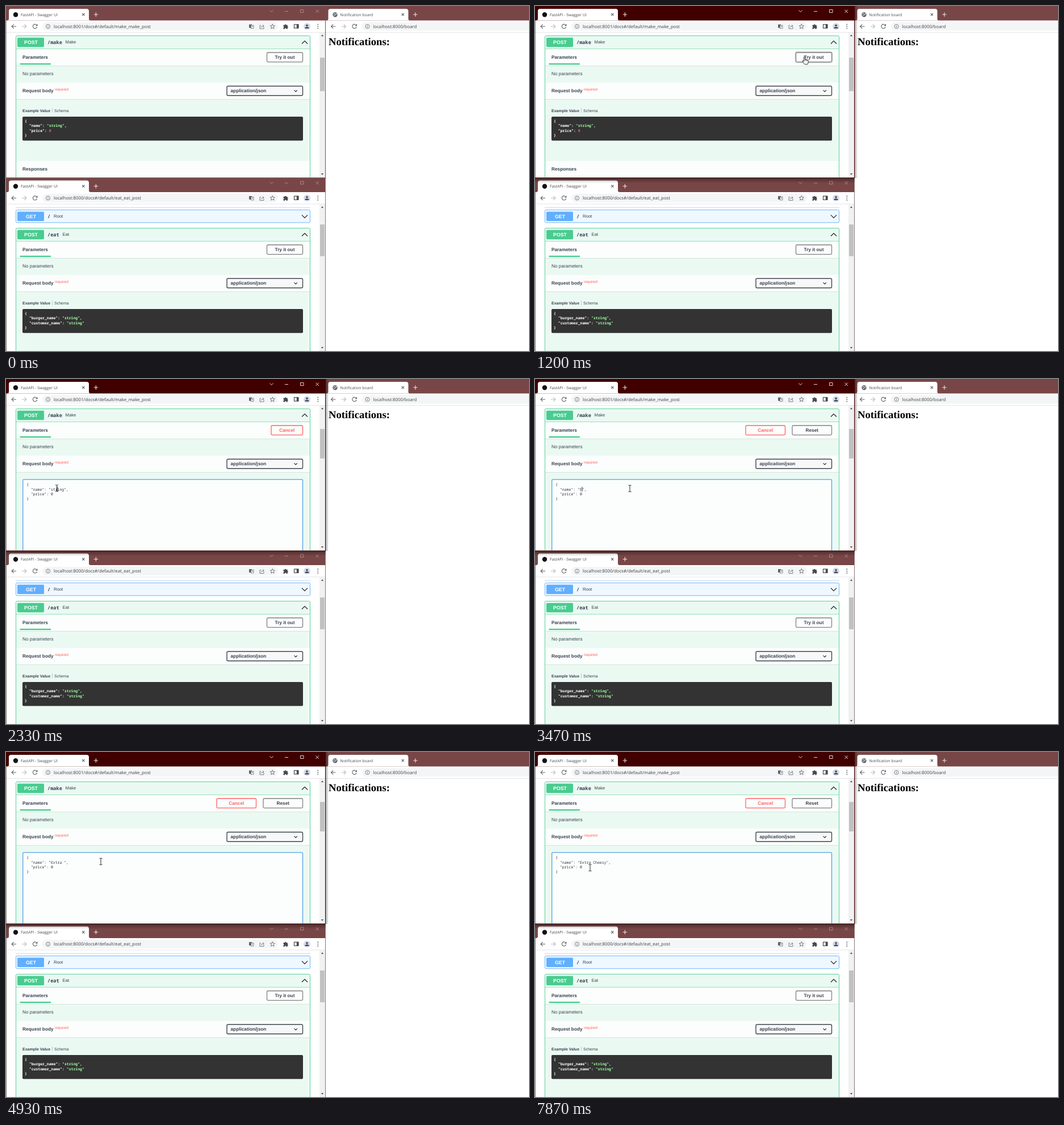
An HTML page for the animation above (8 s loop, 921 by 608 pixels).

```html
<!DOCTYPE html>
<html lang="en">
<head>
<meta charset="utf-8">
<title>Notification board</title>
<style>
  html, body { margin: 0; width: 100%; height: 100%; overflow: hidden; background: #fff; }
  svg { display: block; width: 921px; height: 608px; }
  text { fill: #3b4151; font: 8.25px "Liberation Sans", Arial, sans-serif; text-rendering: geometricPrecision; white-space: pre; }
  .b { font-weight: 700; }
  .tab { font: 6.85px "Open Sans", sans-serif; fill: #45494d; }
  .url { font: 7.77px "Open Sans", sans-serif; fill: #3c4043; }
  .verb { font-size: 8.8px; font-weight: 700; fill: #fff; text-anchor: middle; }
  .path { font: 700 8.65px "Noto Sans Mono", monospace; }
  .desc { font-size: 7.7px; }
  .small { font-size: 7px; }
  .req { font-size: 6.5px; fill: #f33; fill-opacity: .8; }
  .code { font: 6.48px "Noto Sans Mono", monospace; fill: #2b3038; }
  .dark .code { font-weight: 700; fill: #fff; }
  .dark .str { fill: #a2fca2; }
  .dark .num { fill: #d36363; }
  .mid { text-anchor: middle; }
  .head { font: 700 18.7px "Liberation Serif", "Times New Roman", serif; fill: #000; }
  .ico { fill: none; stroke: #5f6368; stroke-width: 1.1; }
  .off { stroke: #b9bcc0; }
  .hover { filter: drop-shadow(0 0 1.3px rgba(0, 0, 0, .5)); }
</style>
</head>
<body>
<svg id="stage" viewBox="0 0 921 608"></svg>
<script>
const CH = 3.888, LOOP = 8000;
const IDLE = '#784646', ACTIVE = '#400000';

const rect = (x, y, w, h, fill, more = '') =>
  `<rect x="${x}" y="${y}" width="${w}" height="${h}" fill="${fill}" ${more}/>`;
const text = (x, y, s, cls = '', more = '') => `<text x="${x}" y="${y}" class="${cls}" ${more}>${s}</text>`;
const line = (d, cls = 'ico', more = '') => `<path d="${d}" class="${cls}" ${more}/>`;
const stroke = (color, width) => `fill="none" stroke="${color}" stroke-width="${width}"`;
const group = (id, body, more = '') => `<g id="${id}" ${more}>${body}</g>`;
const at = (x, y, body) => `<g transform="translate(${x} ${y})">${body}</g>`;

function controls(id) {
  return group(id, `<path d="M464.5 7.5l3 3 3-3M491 9.5h6M518.5 6.5h5.5v5h-5.5zM545.5 6.5l5.5 5.5m0-5.5l-5.5 5.5"/>`,
    'fill="none" stroke="#b18f8f" stroke-width=".9"');
}

function toolbar() {
  return line('M440 0') +
    rect(428, 32.5, 5, 6, '#5f6368') + rect(431.5, 34, 4.5, 5.5, '#fff', 'stroke="#5f6368" stroke-width=".7"') +
    line('M432.8 36h2.2M434 35v3', 'ico', 'style="stroke-width:.6"') +
    line('M449 34h-2v6h7v-3M449 38q.5-3 5-3m-1.8-2l2 2-2 2', 'ico', 'style="stroke-width:.8"') +
    line('M469.3 31.8l1.2 2.7 2.9.3-2.2 2 .7 2.9-2.6-1.5-2.6 1.5.7-2.9-2.2-2 2.9-.3z', 'ico', 'style="stroke-width:.9"') +
    '<path d="M488.5 33.5h2.4a1.3 1.3 0 0 1 2.6 0h2.3v2.4a1.3 1.3 0 0 1 0 2.5v2h-2.3a1.3 1.3 0 0 0-2.6 0h-2.4v-2.2a1.3 1.3 0 0 0 0-2.5z" fill="#45494d"/>' +
    rect(507.5, 32.5, 7.5, 6.5, 'none', 'stroke="#45494d" stroke-width="1.2"') + rect(511.8, 32.5, 3.2, 6.5, '#45494d') +
    '<circle cx="530" cy="36" r="6" fill="#d5dbe8"/><circle cx="530" cy="34.2" r="1.8" fill="#3f485c"/>' +
    '<path d="M526.3 39.5q0-2.7 3.7-2.7t3.7 2.7z" fill="#3f485c"/>' +
    [32.5, 36, 39.5].map(y => `<circle cx="549.3" cy="${y}" r=".9" fill="#5f6368"/>`).join('');
}

// Browser frame: title bar, tab and address row
function chrome(id, w, h, title, url, icon) {
  return rect(0, 0, w, h, '#fff') + rect(0, 0, w, 25.5, IDLE, `id="${id}"`) +
    `<path d="M2 25.5q3 0 3-3V9q0-4 4-4h133q4 0 4 4v13.500q0 3 3 3z" fill="#fff"/>` + icon +
    text(26, 17.6, title, 'tab') +
    line('M134.200 13l4.200 4.200m0-4.200l-4.200 4.200') +
    line('M154.700 15h7.400M158.400 11.300v7.400', 'ico', 'style="stroke:#f1e6e6"') +
    line('M18 36h-8m3.700-3.700L10 36l3.700 3.700') +
    line('M28 36h8m-3.700-3.700L36 36l-3.700 3.700', 'ico off') +
    line('M54.300 34a3.700 3.700 0 1 0 .3 3M55 32v2.700h-2.700') +
    rect(64, 28.5, w < 400 ? 400 : 415, 15, '#f4f5f6', 'rx="7.5"') +
    '<circle cx="74" cy="36" r="3.600" class="ico" style="stroke-width:.8"/>' +
    line('M74 35.400v2.600M74 33.700v.9', 'ico', 'style="stroke-width:.8"') +
    text(84, 38.7, url, 'url') + rect(0, 46, w, .8, '#dcdfe3');
}

function scrollbar(top, bottom, y, h, id) {
  return rect(552, top, 10, bottom - top, '#f1f1f1') +
    rect(553, y, 8, h, '#c1c1c1', `id="${id}"`) +
    `<path d="M554.800 ${top + 6.5}l2.200-2.700 2.200 2.700zM554.800 ${bottom - 7}l2.200 2.700 2.200-2.700z" fill="#505050"/>`;
}

function blockHead(y, h, color, tint, verb, path, desc, descX, open) {
  const c = y + 11.5, s = open ? 1 : -1;
  return rect(17.5, y, 518, h, tint, `rx="2" stroke="${color}" stroke-width=".9"`) +
    rect(20, y + 3.2, 47, 16.6, color, 'rx="1.800"') + text(44, c + 3.1, verb, 'verb') +
    text(73, c + 3, path, 'path') + text(descX, c + 2.4, desc, 'desc') +
    line(`M521 ${c + 2.5 * s}l5 ${-5 * s} 5 ${5 * s}`, 'ico', 'style="stroke:#222;stroke-width:1.200"');
}

function button(id, x, w, label, color = '#3b4151', edge = '#808080') {
  return group(id, rect(x, 82, w, 16.6, '#fcfefd', `rx="1.800" stroke="${edge}" stroke-width="1.300"`) +
    text(x + w / 2, 93.3, label, 'b mid', `style="fill:${color}"`));
}

// Expanded endpoint, laid out for the upper window
function endpoint(path, desc, descX, buttons, body) {
  const white = 'rgba(255,255,255,.8)';
  return blockHead(52.5, 270, '#49cc90', '#ebf9f3', 'POST', path, desc, descX, true) +
    rect(17.5, 75, 518, .8, '#7ddab0') +
    rect(18, 76, 517, 29, white) + rect(18, 105, 517, .9, '#d3e5dd') +
    text(29, 93.2, 'Parameters', 'b') + rect(24.5, 101, 54.5, 2.4, '#49cc90') +
    text(29, 121.5, 'No parameters') +
    rect(18, 135, 517, 29, white) + rect(18, 164, 517, .9, '#d3e5dd') +
    text(29, 152.4, 'Request body', 'b') + text(86, 149.2, 'required', 'req') +
    rect(389, 141.2, 133.5, 16.6, '#f7f9f9', 'rx="2" stroke="#41444e" stroke-width="1.400"') +
    text(395.5, 152.4, 'application/json', 'b') +
    line('M507.500 148.300l2.700 2.700 2.700-2.700', 'ico', 'style="stroke:#222"') + buttons + body;
}

function example(lines) {
  return text(29, 186.5, 'Example Value', 'small b') + rect(81.3, 180, .6, 8, '#9aa3a0') +
    text(85, 186.5, 'Schema', 'small') +
    '<g class="dark">' + rect(29, 195, 494, 42.3, '#333', 'rx="2"') +
    text(33, 205.2, '{', 'code') +
    lines.map(([key, val, cls, end], i) =>
      text(33 + 2 * CH, 213.4 + 8.2 * i,
        `"${key}": <tspan class="${cls}">${val}</tspan>${end}`, 'code')).join('') +
    text(33, 229.8, '}', 'code') + '</g>';
}

const dot = '<circle cx="17" cy="15.300" r="4.200" fill="#111"/>';
const globe = '<circle cx="17" cy="15.300" r="4.200" fill="#5f6368"/>' +
  '<path d="M14 14.500q2 .2 2.500-2.500M15 18q0-2 2-2t1.500-2 2 0" fill="none" stroke="#fff" stroke-width=".9"/>';

const editor = rect(29, 176.5, 494, 140, '#fbfefc', 'id="field" rx="1.500"') +
  group('json', rect(79, 189.7, 6 * CH, 8.4, '#3390ff', 'id="mark"') +
    text(36.2, 188.4, '{', 'code') + text(36.2 + 2 * CH, 196.5, '', 'code', 'id="name"') +
    text(36.2 + 2 * CH, 204.6, '"price": 0', 'code') + text(36.2, 212.7, '}', 'code')) +
  rect(0, 0, .8, 8.5, '#111', 'id="caret"');

const upper = chrome('bar', 562, 303, 'FastAPI - Swagger UI', 'localhost:8001/docs#/default/make_make_post', dot) +
  controls('ctl') + toolbar() +
  endpoint('/make', 'Make', 104.5,
    button('try', 459.5, 63, 'Try it out') + button('cancel', 467, 55.5, 'Cancel') +
    button('cancel2', 371, 69.5, 'Cancel', '#ff6060', '#ff6060') + button('reset', 453, 69.5, 'Reset'),
    group('sample', example([['name', '"string"', 'str', ','], ['price', '0', 'num', '']]) +
      rect(18, 273, 517, 40, 'rgba(255,255,255,.8)') + text(29, 290.3, 'Responses', 'b')) +
    group('edit', editor)) +
  scrollbar(46.8, 302, 91, 59, 'thumb');

const lower = at(0, 302.5, chrome('bar2', 562, 306, 'FastAPI - Swagger UI',
    'localhost:8000/docs#/default/eat_eat_post', dot) + controls('ctl2') + toolbar()) +
  rect(17, 354.6, 519, .9, '#b5d4f2') +
  blockHead(359.3, 22.5, '#61affe', '#eff7ff', 'GET', '/', 'Root', 84, false) +
  at(0, 339, endpoint('/eat', 'Eat', 99.5, button('try2', 459.5, 63, 'Try it out'),
    example([['burger_name', '"string"', 'str', ','], ['customer_name', '"string"', 'str', '']]))) +
  scrollbar(349.3, 608, 385, 56, 'thumb2');

const right = at(562.5, 0, chrome('bar3', 359, 608, 'Notification board', 'localhost:8000/board', globe)) +
  text(568, 69, 'Notifications:', 'head');

const fade = (id, x, y) => `<linearGradient id="${id}" x2="${x}" y2="${y}">` +
  '<stop stop-opacity=".35"/><stop offset="1" stop-opacity="0"/></linearGradient>';

const cursors = group('arrow', '<path d="M0 0v11.500l2.700-2.500 1.800 4 1.900-.8-1.800-4h3.700z" fill="#fff" stroke="#000" stroke-width=".8"/>') +
  group('hand', '<path d="M-1 .8q1-1.500 2 0v4.200l4.200 1q2 .5 1.800 2.300l-.6 3-.9 2.500h-5l-4-5q-.4-1.700 1.200-1.200l1.300 1.200z" fill="#fff" stroke="#000" stroke-width=".8"/>' +
    line('M1 5v3M3 5.600v2.600M5 6v2.400', 'ico', 'style="stroke:#000;stroke-width:.6"')) +
  group('beam', line('M-2.500-5.700h1.800L0-5.200.7-5.700h1.800M0-5.200v10.400M-2.500 5.700h1.800L0 5.200l.7.500h1.800', 'ico', 'style="stroke:#111;stroke-width:.9"'));

stage.innerHTML = '<defs>' + fade('down', 0, 1) + fade('side', 1, 0) + '</defs>' +
  upper + lower + right +
  rect(0, 0, 562.5, 303, 'none', 'id="edge" stroke-width="1"') +
  rect(562, 303, .8, 305, '#6d5555') + rect(0, 303, .8, 305, '#6d5555') +
  group('shadow', rect(0, 303, 563, 9, 'url(#down)') + rect(563, 0, 5, 303, 'url(#side)')) +
  group('cursor', cursors);

const el = {};
stage.querySelectorAll('[id]').forEach(n => el[n.id] = n);
const show = (id, on) => el[id].setAttribute('display', on ? 'inline' : 'none');
const set = (id, attrs) => { for (const k in attrs) el[id].setAttribute(k, attrs[k]); };
const clamp = v => Math.max(0, Math.min(1, v));

// Pointer stops: leave time, arrival time, x, y
const moves = [[270, 800, 474.5, 89], [1400, 2000, 89.5, 192.5], [2470, 2730, 167, 193], [6865, 7330, 97, 204]];
const phrase = 'Extra Cheesy';
const keys = [3470, 3730, 4000, 4130, 4270, 4400, 5330, 5530, 5800, 5930, 6130, 6330];

function pointer(t) {
  let x = 912, y = 521;
  for (const [from, to, tx, ty] of moves) {
    const p = clamp((t - from) / (to - from)), e = p * p * (3 - 2 * p);
    x += (tx - x) * e;
    y += (ty - y) * e;
  }
  return [x, y];
}

function draw(t) {
  const tick = Math.floor((t + 4) * 15 / 1000) * 1000 / 15;
  const active = t >= 1200, edit = t >= 1270, focus = t >= 2130, typing = t >= 3470;
  const [x, y] = pointer(tick + 3);

  set('bar', { fill: active ? ACTIVE : IDLE });
  set('ctl', { stroke: active ? '#f3eaea' : '#b18f8f' });
  set('edge', { stroke: active ? ACTIVE : '#6d5555' });
  show('shadow', active);
  show('sample', !edit);
  show('edit', edit);
  set('thumb', edit ? { y: 88, height: 52 } : { y: 91, height: 59 });

  show('try', !edit);
  show('cancel', edit && !typing);
  show('cancel2', typing);
  show('reset', typing);
  const over = x > (edit ? 467 : 459) && x < 523 && y > 82 && y < 99;
  el.try.classList.toggle('hover', active && over);
  el.cancel.classList.toggle('hover', over);
  const k = clamp((tick - 1267) / 300);
  const mix = (a, b) => `rgb(${a.map((v, i) => Math.round(v + (b[i] - v) * k))})`;
  el.cancel.firstChild.setAttribute('stroke', mix([90, 90, 90], [255, 96, 96]));
  el.cancel.lastChild.style.fill = mix([59, 65, 81], [255, 96, 96]);

  set('field', focus
    ? { x: 29.7, width: 492.8, y: 177.2, stroke: '#559fe8', 'stroke-width': 1.3 }
    : { x: 29, width: 494, y: 176.5, stroke: 'none' });
  set('json', { transform: focus ? '' : 'translate(-1.400 -1.200)' });
  const count = keys.filter(v => t >= v).length;
  const marked = t >= 2470 && !typing;
  const value = typing ? phrase.slice(0, count) : 'string';
  const html = `"name": "<tspan${marked ? ' style="fill:#fff"' : ''}>${value}</tspan>",`;
  if (el.name.innerHTML !== html) el.name.innerHTML = html;
  show('mark', marked);

  const below = t >= 7330;
  const blink = (t >= 4930 && t < 5330) || (t >= 6930 && !below) || t >= 7870;
  show('caret', focus && !marked && !blink);
  set('caret', { x: below ? 82.5 : 78.8 + CH * (typing ? count : 3), y: below ? 198.2 : 189.8 });

  const beam = edit && !over && x > 29 && x < 523 && y > 177;
  show('cursor', t >= 270);
  set('cursor', { transform: `translate(${x} ${y})` });
  show('hand', over);
  show('beam', beam);
  show('arrow', !over && !beam);
}

const start = performance.now();
function frame() {
  draw((performance.now() - start) % LOOP);
  requestAnimationFrame(frame);
}
frame();
</script>
</body>
</html>
```
